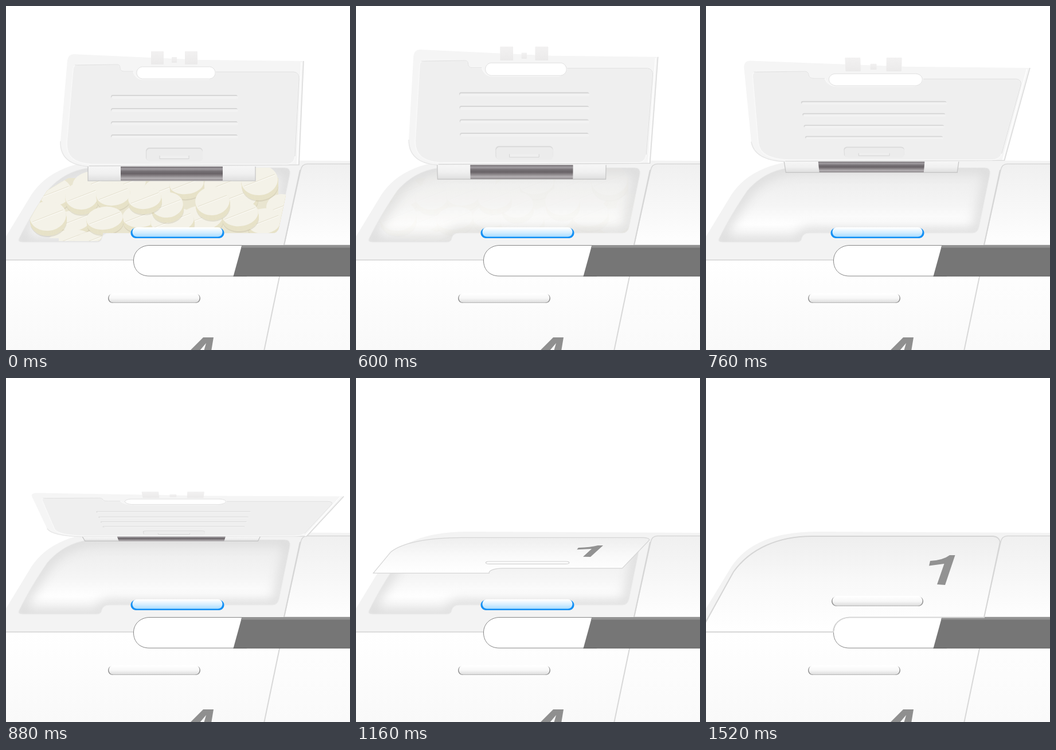
Animation, 600 px wide and 600 px high, one loop 1920 ms. Source, as an HTML page with a canvas:

```html
<!DOCTYPE html>
<html lang="en">
<head>
<meta charset="utf-8">
<title>Pill box</title>
<style>
  html, body { margin: 0; width: 100%; height: 100%; overflow: hidden; background: #fff; }
  canvas { display: block; width: 600px; height: 600px; }
</style>
</head>
<body>
<canvas id="stage" width="600" height="600"></canvas>
<script>
const ctx = document.getElementById('stage').getContext('2d');
const LOOP = 1920, STEP = 40, RAD = Math.PI / 180;
const flat = (x, y) => [x, y];

// Builds a path from an absolute M/L/C/Q/Z string, sending each point through a projection.
function shape(d, project = flat) {
  const path = new Path2D();
  const method = { M: 'moveTo', L: 'lineTo', C: 'bezierCurveTo', Q: 'quadraticCurveTo', Z: 'closePath' };
  for (const [, op, args] of d.matchAll(/([MLCQZ])([^MLCQZ]*)/g)) {
    const n = (args.match(/-?[\d.]+/g) || []).map(Number);
    const pts = [];
    for (let i = 0; i < n.length; i += 2) pts.push(...project(n[i], n[i + 1]));
    path[method[op]](...pts);
  }
  return path;
}

function rounded(x, y, w, h, r) {
  const q = r * 0.448, X = x + w, Y = y + h;
  return `M${x + r} ${y}L${X - r} ${y}C${X - q} ${y} ${X} ${y + q} ${X} ${y + r}` +
    `L${X} ${Y - r}C${X} ${Y - q} ${X - q} ${Y} ${X - r} ${Y}` +
    `L${x + r} ${Y}C${x + q} ${Y} ${x} ${Y - q} ${x} ${Y - r}` +
    `L${x} ${y + r}C${x} ${y + q} ${x + q} ${y} ${x + r} ${y}Z`;
}

function fade(y0, y1, ...colors) {
  const g = ctx.createLinearGradient(0, y0, 0, y1);
  colors.forEach((c, i) => g.addColorStop(i / (colors.length - 1), c));
  return g;
}

function paint(path, fill, stroke, width = 1) {
  if (fill) { ctx.fillStyle = fill; ctx.fill(path); }
  if (stroke) { ctx.strokeStyle = stroke; ctx.lineWidth = width; ctx.stroke(path); }
}

function along(keys, t) {
  if (t <= keys[0][0]) return keys[0][1];
  for (let i = 1; i < keys.length; i++) {
    const [t0, v0] = keys[i - 1], [t1, v1] = keys[i];
    if (t <= t1) return v0 + (v1 - v0) * (t - t0) / (t1 - t0);
  }
  return keys[keys.length - 1][1];
}

const BASE = shape('M0 402L45 328C72 289 118 268 195 268L600 270L600 600L0 600Z');
const TRAY = shape('M23 405Q19 412 30 412L158 412Q166 412 167 405Q169 396 180 396L464 396' +
  'Q474 396 476 386L495 294Q497 282 486 282L152 282C120 283 92 299 72 322C56 345 36 378 23 405Z');
const PILL_AREA = shape('M40 405L92 405L92 410L160 410Q167 408 169 396L464 396Q474 396 476 386' +
  'L488 330L480 282L130 282L112 298L72 322C60 340 45 365 38 380Z');
const FACE = 'M-10 443L48 338C77 298 125 276 185 276L501 276Q511 277 513 286L485 417.5' +
  'L250 417.5C234 418 222 429 222 443Z';
const ONE = 'M425 309L434.5 309L417 361L403 360L415.5 324L389 327.5L391 319Q413 318 425 309Z';
const FOUR = 'M344 578L362 578L358 602L345 602L349 588L337 602L320 602Z';

const PILLS = [
  [150, 310, 34, 22], [212, 308, 32, 22], [375, 312, 30, 22], [270, 322, 32, 22], [405, 330, 34, 26],
  [340, 370, 38, 22], [480, 350, 26, 22], [450, 375, 30, 22], [118, 374, 30, 18], [235, 366, 32, 20],
  [110, 406, 36, 16], [150, 408, 32, 15], [290, 374, 38, 22], [85, 324, 29, 24], [315, 310, 30, 18],
  [281, 347, 28, 22], [132, 331, 29, 24], [187, 328, 30, 20], [172, 370, 32, 20], [73, 366, 32, 26],
  [408, 362, 32, 22], [242, 335, 29, 19], [360, 340, 30, 25], [442, 304, 32, 26]
];

// The pills live on their own layer so that the pile fades as one picture.
function makePillLayer() {
  const layer = document.createElement('canvas');
  layer.width = layer.height = 600;
  const g = layer.getContext('2d');
  g.clip(PILL_AREA);
  g.fillStyle = '#e9e5d0';
  g.fillRect(70, 300, 405, 97);
  for (const [x, y, rx, ry] of PILLS) {
    g.save();
    g.translate(x, y);
    g.rotate(-0.12);
    const disc = (dy, fill) => {
      g.beginPath();
      g.ellipse(0, dy, rx, ry, 0, 0, 7);
      g.fillStyle = fill;
      g.fill();
    };
    disc(11, 'rgba(150,140,105,.2)');
    for (let dy = 9; dy > 0; dy--) disc(dy, '#e7e2c8');
    disc(0, '#f4f2e8');
    g.rotate(-0.25);
    for (const [dy, color] of [[0, '#e5e1d0'], [1.2, '#fcfbf6']]) {
      g.beginPath();
      g.moveTo(-rx * 0.9, dy);
      g.lineTo(rx * 0.9, dy);
      g.strokeStyle = color;
      g.stroke();
    }
    g.restore();
  }
  return layer;
}
const pillLayer = makePillLayer();

function drawPills(alpha) {
  if (alpha <= 0) return;
  ctx.globalAlpha = alpha;
  ctx.drawImage(pillLayer, 0, 0);
  ctx.globalAlpha = 1;
}

function drawSlot(x, y, w, h, blue) {
  const body = shape(rounded(x, y, w, h, h / 2));
  if (blue) {
    paint(body, '#1390f5');
    paint(shape(rounded(x + 3, y - 1, w - 6, h - 1.5, h / 2 - 1)), fade(y, y + h, '#ffffff', '#d2edff', '#9ad7ff'));
  } else {
    paint(body, '#929292');
    paint(shape(rounded(x + 1.5, y - 1, w - 3, h + 0.5, h / 2)), fade(y, y + h, '#ffffff', '#f7f7f7', '#d9d9d9'));
  }
}

function drawBody() {
  ctx.fillStyle = '#ffffff';
  ctx.fillRect(0, 0, 600, 600);
  paint(BASE, '#f3f3f3');
  paint(shape('M485 417L514 286Q516 276 525 275.5L602 275.5L602 417Z'),
    fade(276, 417, '#f0f0f0', '#fefefe'), '#d8d8d8', 1.6);
  paint(shape('M0 443L483 443L450 600L0 600Z'), fade(443, 600, '#ffffff', '#f9f9f9'));
  paint(shape('M483 443L600 443L600 600L450 600Z'), fade(443, 600, '#fefefe', '#fafafa'));
  paint(shape('M483 443L450 602'), null, '#d8d8d8', 2);
  paint(shape('M0 443L224 443'), null, '#d2d2d2', 1.6);
  paint(shape(FOUR), '#8f8f8f');
  drawSlot(178, 502, 161, 16, false);
}

function drawTray() {
  ctx.save();
  ctx.clip(TRAY);
  ctx.fillStyle = fade(282, 412, '#ececec', '#f0f0f0', '#f5f5f5', '#fefefe', '#f6f6f6');
  ctx.fillRect(0, 270, 600, 150);
  ctx.filter = 'blur(10px)';
  paint(TRAY, null, '#dadada', 18);
  ctx.restore();
  paint(TRAY, null, '#ececec');
}

function drawBand() {
  paint(shape('M420 417.5L250 417.5C234 418 222.5 429 222.5 444C222.5 460 233 471 250 471L420 471Z'),
    '#ffffff', '#858585');
  paint(shape('M411.5 417L600 417L600 471.5L396.5 471.5Z'), '#767676');
  paint(shape('M411.5 417L600 417L600 421.5L410 421.5Z'), '#929292');
  paint(shape('M396.5 471L600 471'), null, '#626262');
}

// Underside of the lid; tilt 0 stands upright, 90 points at the viewer.
function drawUnderside(tilt) {
  const sin = Math.sin(tilt * RAD), cos = Math.cos(tilt * RAD);
  const project = (x, y) => {
    const h = 305 - y, depth = 1 - 0.00108 * sin * h;
    return [300 + (x - 300) * (1 + 0.035 * sin) / depth, 300 + (5 - 21.5 * sin - cos * h) / depth];
  };
  const level = y => project(300, y)[1];
  const part = (d, fill, stroke, width) => paint(shape(d, project), fill, stroke, width);
  const box = (x, y, w, h, r, fill, stroke) => part(rounded(x, y, w, h, r), fill, stroke);

  part('M118 84L340 94L519 96L511 277L145 280C112 278 94 264 95 236L107 95Q109 84 118 84Z', '#f5f5f5');
  part('M145 280C112 278 94 264 95 236', null, '#e6e6e6', 1.4);
  part('M519 96L511 277L145 279', null, '#dadada', 1.5);
  part('M515 98L508 276', null, '#ffffff', 1.5);
  part('M126 102L194 102Q199 102 199 108Q199 114 206 114L222 114Q226 128 240 128L352 128' +
    'Q364 126 366 115L502 115Q512 116 511 128L504 262Q503 275 490 276L150 276' +
    'C118 274 105 262 106 238L117 110Q118 102 126 102Z', '#efefef', '#f9f9f9', 1.5);
  part('M120 103L194 102Q199 102 199 108Q199 114 206 114L222 114', null, '#e0e0e0');
  part('M366 115L502 115Q512 116 511 128L504 262', null, '#dddddd');
  box(228, 106, 137, 21, 10.5, '#ffffff', '#e0e0e0');

  for (let i = 0; i < 4; i++) {
    const y = 155 + 23 * i;
    box(183, y, 221, 6, 3, '#d6d6d6');
    box(184, y + 2, 221, 5, 2.5, '#f2f2f2');
  }
  box(244, 247, 99, 23, 6, '#dadada');
  box(245, 249, 98, 22, 6, '#ececec');
  box(268, 261, 51, 6, 1.5, '#efefef');
  part('M268 261L268 266.5L319 266.5L319 261', null, '#d4d4d4');

  for (const [x, y, w, h] of [[253, 79, 22, 23], [289, 89, 9, 10], [312, 79, 22, 23]]) {
    box(x, y, w, h, 1, fade(level(y), level(y + h), '#f2f1f1', '#ebeaea'));
  }
  box(143, 280, 292, 25, 1, fade(level(280), level(305), '#f6f6f6', '#f0f0f0', '#dedede'));
  part('M143 280L143 305L435 305L435 280', null, '#c4c4c4', 1.2);
  box(200, 280, 178, 24.5, 0.5,
    fade(level(280), level(305), '#757074', '#a19da1', '#757074', '#696367', '#8d888b', '#b6b2b5', '#827d80'));
}

// Outer face of the lid; angle 90 is edge-on, 0 is shut.
function drawFace(angle, shut) {
  const sin = Math.sin(angle * RAD), cos = Math.cos(angle * RAD);
  const project = (x, y) => {
    const h = y - 280, s = 1000 / (1000 + h * sin);
    return [300 + (x - 300) * s, 300 + (h * cos - 20) * s];
  };
  const level = y => project(300, y)[1];
  paint(shape(FACE, project), fade(level(276), level(443), '#eeeeee', '#f9f9f9', '#ffffff'),
    '#d6d6d6', shut ? 2 : 1.3);
  paint(shape(ONE, project), '#929292');
  if (shut) drawSlot(219, 381, 160, 17, false);
  else paint(shape(rounded(219, 383, 160, 12.5, 6.2), project), '#fcfcfc', '#d2d2d2', 1.2);
}

const TILT = [[560, 0], [600, 7.5], [760, 43], [880, 74], [940, 90]];
const CLOSE = [[950, 90], [1160, 66], [1320, 33], [1400, 16.4], [1480, 0]];

function draw(time) {
  const t = Math.floor(time % LOOP / STEP) * STEP;
  const shut = t >= 1520;
  drawBody();
  if (!shut) {
    drawTray();
    drawPills(t < 320 ? 1 : 1 - (t - 280) / 360);
    paint(shape('M513 286L485 417'), null, '#d6d6d6', 2);
    drawSlot(217.5, 387, 163, 18, true);
  }
  drawBand();
  if (t < 940) drawUnderside(along(TILT, t));
  else drawFace(along(CLOSE, t), shut);
}

const start = performance.now();
function tick() {
  draw(performance.now() - start);
  requestAnimationFrame(tick);
}
tick();
</script>
</body>
</html>
```
